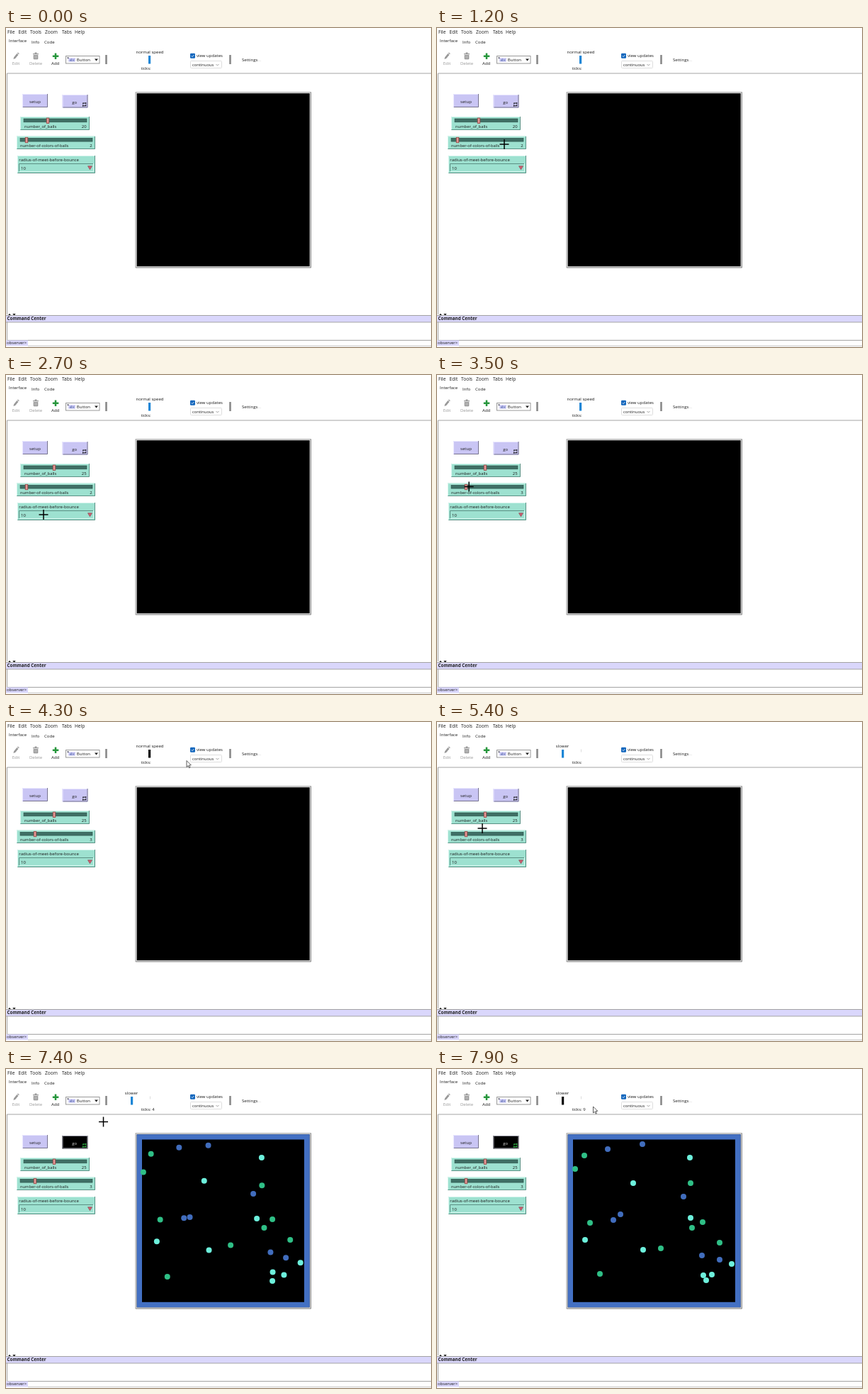
These frames come from a looping animation (600 px wide and 450 px high, 8 s). An HTML page:

```html
<!DOCTYPE html>
<html lang="en">
<head>
<meta charset="utf-8">
<title>Bouncing balls model</title>
<style>
html, body { margin: 0; width: 100%; height: 100%; overflow: hidden; background: #fff; }
svg { display: block; width: 600px; height: 450px; font: 6.05px "Open Sans", "Noto Sans", sans-serif; fill: #1c1c1c; }
text { white-space: pre; }
.menu { font-size: 6.6px; }
.mid { text-anchor: middle; }
.end { text-anchor: end; }
.off { fill: #999; }
.widget { font-size: 5.85px; }
.line { stroke: #a3a3a3; fill: none; }
.lilac { fill: #dad7fc; }
.teal { fill: #9de1d0; }
.hi { stroke: #d3f4ec; fill: none; }
.lo { stroke: #5c9185; fill: none; }
.track { fill: #3f6f65; stroke: #2c5148; stroke-width: .6; }
.thumb rect { fill: #d88080; stroke: #97413f; stroke-width: .7; }
.thumb path { stroke: #f4c4bf; stroke-width: .8; }
.btn .face { fill: #c9c5f4; }
.btn .top { stroke: #e9e7ff; fill: none; }
.btn .low { stroke: #77748f; fill: none; }
.btn .loop { stroke: #111; stroke-width: 1.1; fill: none; }
.btn.down .face { fill: #000; }
.btn.down .top { stroke: #8b8b98; }
.btn.down .low { stroke: #b5b5c0; }
.btn.down text { fill: #d9d9d9; }
.btn.down .loop { stroke: #35d04f; }
#cross { stroke: #000; stroke-width: 1.5; fill: none; }
#cross.inverse { stroke: #fff; mix-blend-mode: difference; }
</style>
</head>
<body>
<svg viewBox="0 0 600 450">
  <rect width="600" height="450" fill="#fff"/>

  <g class="menu">
    <text x="2" y="8">File</text><text x="17.5" y="8">Edit</text><text x="34" y="8">Tools</text>
    <text x="55" y="8">Zoom</text><text x="79" y="8">Tabs</text><text x="97" y="8">Help</text>
  </g>
  <text x="4" y="20">Interface</text><text x="36" y="21.5">Info</text><text x="54" y="21.5">Code</text>

  <g class="off">
    <path d="M10.5 44l.6-2.800 4.300-5.200 2.100 1.700-4.300 5.300zM15.900 35.400l.9-.9 2 1.600-.8 1z"/>
    <path d="M38 36h2.500v-1.500h3V36H46v1.200h-8zM38.700 38h6.600v5.300q0 1-1 1h-4.600q-1 0-1-1z"/>
    <path d="M40.700 39v4M42 39v4M43.300 39v4" stroke="#ddd" stroke-width=".5"/>
    <text class="mid" x="14" y="52">Edit</text><text class="mid" x="42" y="52">Delete</text>
  </g>
  <path d="M70 35.500v8.500M65.800 39.700h8.500" stroke="#27963c" stroke-width="2.500"/>
  <text class="mid" x="69.700" y="52">Add</text>

  <rect x="84.500" y="39.500" width="47.500" height="10.500" fill="#fff" stroke="#999"/>
  <rect x="88" y="42" width="10" height="5.500" fill="#d2d0f6"/>
  <text x="89.500" y="46.600" font-size="4.600" fill="#334a9c">abc</text>
  <path d="M86 41.500h3l-1.500 2z" fill="#334"/>
  <text x="99.800" y="47">Button</text>
  <path d="M125 43.500h5l-2.500 3z"/>
  <path d="M141.500 38v13M316.500 38v13" stroke="#898989" stroke-width="2.600"/>

  <text id="speed" class="mid" y="36.300"></text>
  <path id="notch" d="M203.500 38.500v4" stroke="#d4d4d4" stroke-width=".8"/>
  <rect id="knob" y="39" width="3.200" height="11.500"/>
  <text id="ticks" x="190.500" y="58.600"></text>

  <rect x="260" y="35.800" width="7" height="7" rx="1.300" fill="#1467bd"/>
  <path d="M261.700 39.300l1.300 1.400 2.400-2.700" stroke="#fff" stroke-width=".8" fill="none"/>
  <text x="269" y="41.300">view updates</text>
  <rect x="260.500" y="46.500" width="44" height="10" rx="1" fill="#fff" stroke="#dedede"/>
  <text x="263" y="54" font-size="5.800">continuous</text>
  <path d="M296.500 51l2 2 2-2" stroke="#888" stroke-width=".8" fill="none"/>
  <text x="333" y="46.500">Settings<tspan fill="#bbb">...</tspan></text>

  <path class="line" d="M600 64H1.500V404"/>

  <g class="btn" id="setup">
    <rect class="face" x="23" y="93" width="36" height="19"/>
    <path class="top" d="M23.500 111V93.500H58"/><path class="low" d="M24 111.500H58.500V93"/>
    <text class="mid" x="41" y="105.700">setup</text>
  </g>
  <g class="btn" id="go">
    <rect class="face" x="79.500" y="94" width="36" height="18.500"/>
    <path class="top" d="M80 111.500V94.500H115"/><path class="low" d="M80.500 112H115V94"/>
    <text class="mid" x="96.700" y="106.500">go</text>
    <path class="loop" d="M108.700 107.300v-1.300h3.200M112.700 105v2.200M112.700 108.300v1.400h-3.300M108.600 110.800v-2.400"/>
  </g>

  <g class="widget">
    <rect class="teal" x="20" y="125" width="98" height="19"/>
    <path class="hi" d="M20.500 143V125.500H117"/><path class="lo" d="M20.500 143.500H117.500V125"/>
    <rect class="track" x="25" y="128" width="89" height="4.800"/>
    <text x="26" y="140.600">number_of_balls</text><text class="end" id="count" x="113.500" y="140.600"></text>
    <g class="thumb" id="countThumb"><rect x="-1.800" y="127" width="3.600" height="7.500"/><path d="M0 128v5.500"/></g>

    <rect class="teal" x="15" y="152.500" width="111" height="18.500"/>
    <path class="hi" d="M15.500 170V153H125"/><path class="lo" d="M15.500 170.500H125.500V153"/>
    <rect class="track" x="20" y="155.300" width="102" height="4.800"/>
    <text x="20" y="168" font-size="5.750">number-of-colors-of-balls</text><text class="end" id="colors" x="121.700" y="168"></text>
    <g class="thumb" id="colorThumb"><rect x="-1.800" y="154.300" width="3.600" height="7.500"/><path d="M0 155.300v5.500"/></g>

    <rect class="teal" x="16" y="180" width="110" height="25"/>
    <path class="hi" d="M16.500 204V180.500H125"/><path class="lo" d="M16.500 204.500H125.500V180"/>
    <text x="18.300" y="188" font-size="6">radius-of-meet-before-bounce</text>
    <path class="lo" d="M18.500 202V191.500H123"/><path class="hi" d="M19 202.500H123.500V191"/>
    <text x="21" y="199.700" font-size="6">10</text>
    <path d="M115.500 194.800h6l-3 5z" fill="#cf5f70" stroke="#853b4a" stroke-width=".6"/>
  </g>

  <rect x="182.500" y="90" width="248.500" height="248.500" fill="#d9d9d9"/>
  <path d="M183 338V90.500H430.500" fill="none" stroke="#b0b0b0"/>
  <path d="M183 338H430.500V90.500" fill="none" stroke="#8c8c8c"/>
  <rect x="184.700" y="92.200" width="244" height="244" fill="#000"/>
  <g id="world">
    <rect x="184.700" y="92.200" width="244" height="244" fill="#4370c3"/>
    <rect x="192" y="99.500" width="229" height="229.300" fill="#000"/>
    <g id="balls"></g>
  </g>

  <path d="M2.800 405.500l2.200-2.800 2.200 2.800zM9.300 403h4.400l-2.200 2.700z"/>
  <rect class="lilac" y="405.500" width="600" height="9.500"/>
  <path class="line" d="M0 405.500H600M0 415H600M1.500 415V440.500H600"/>
  <text x="1.500" y="412.400" font-size="6.300" font-weight="700">Command Center</text>
  <rect class="lilac" y="440.500" width="31" height="8"/>
  <text x="1" y="446.400" font-size="6">observer&gt;</text>
  <path class="line" d="M31 448.500H600" opacity=".6"/>

  <path id="cross" d="M-6.500 0h13M0-7v14"/>
  <path id="arrow" d="M0 0v9l2.100-1.900 1.500 3.100 1.400-.7-1.500-3 2.800-.2z" fill="#fff" stroke="#333" stroke-width=".8"/>
</svg>
<script>
const LOOP = 8000, FRAME = 100, SETUP = 5900, START = 7000;
const $ = id => document.getElementById(id);
const ramp = (t, a, b) => Math.min(1, Math.max(0, (t - a) / (b - a)));
const place = (el, x, y) => el.setAttribute('transform', `translate(${x} ${y})`);

// x, y, then the distance covered in nine ticks
const groups = {
  '#2fbf86': [[202,118,6,4], [193,149,2,-8], [219,209,-3,8], [226,296,4,-7], [318,245,-2,8],
              [364,167,-6,-6], [377,209,-2,7], [368,224,-8,0], [403,238,-4,7]],
  '#416dbd': [[247,109,-6,4], [282,109,8,-3], [350,173,-2,7], [253,208,-4,5], [260,212,-1,-7],
              [373,255,1,8], [392,264,7,5]],
  '#6df0dc': [[364,125,-7,0], [282,155,-5,6], [351,212,7,-2], [283,256,8,-1], [216,245,-7,-4],
              [377,283,-1,8], [373,300,7,-2], [396,291,-8,-1], [413,272,6,3]]
};
const RIGHT = 417.5;
const balls = Object.entries(groups).flatMap(([color, list]) => list.map(path => {
  const el = document.createElementNS('http://www.w3.org/2000/svg', 'circle');
  el.setAttribute('r', 4);
  el.setAttribute('fill', color);
  $('balls').append(el);
  return { el, path };
}));

// time, x, y
const route = [
  [400,150,420], [700,112,250], [1000,90,170], [1200,95,164], [1600,59,131], [1700,59,131],
  [2200,68,131], [2700,53,197], [3000,29,158], [3400,41,158], [3700,57,156], [4100,203,45],
  [4300,255,54.5], [4500,203,45], [4700,178,45], [4900,178,45], [5100,120,277], [5400,64,150],
  [5800,41,104], [5900,41,104], [6300,216,245], [6800,97,104], [7100,97,104], [7700,178,45],
  [7900,220.5,53]
];

function pointer(t) {
  const i = route.findIndex(k => k[0] >= t);
  if (i < 1) return route[0].slice(1);
  const [a, b] = [route[i - 1], route[i]];
  const p = ramp(t, a[0], b[0]), e = p * p * (3 - 2 * p);
  return [a[1] + (b[1] - a[1]) * e, a[2] + (b[2] - a[2]) * e];
}

function drawPointer(t) {
  const [x, y] = pointer(t), shown = t >= route[0][0], tool = y < 64;
  const inView = x > 185 && x < 428 && y > 92 && y < 336;
  $('cross').style.display = shown && !tool ? '' : 'none';
  $('arrow').style.display = shown && tool ? '' : 'none';
  $('cross').classList.toggle('inverse', inView);
  place($('cross'), x, y);
  place($('arrow'), x, y);
}

function drawControls(t) {
  const many = ramp(t, 1700, 2200), hues = ramp(t, 3000, 3400) >= .5 ? 1 : 0;
  $('count').textContent = 20 + Math.round(5 * many);
  place($('countThumb'), 59 + 9 * many, 0);
  $('colors').textContent = 2 + hues;
  place($('colorThumb'), 29 + 12 * hues, 0);

  const slow = ramp(t, 4500, 4700);
  $('speed').textContent = slow ? 'slower' : 'normal speed';
  $('speed').setAttribute('x', slow ? 177 : 203);
  $('notch').style.display = slow ? '' : 'none';
  $('knob').setAttribute('x', 201 - 25 * slow);
  $('knob').setAttribute('fill', (t >= 4100 && t < 5000) || t >= 7700 ? '#000' : '#1c86d6');

  $('setup').classList.toggle('down', t >= 5800 && t < 6000);
  $('go').classList.toggle('down', t >= START - 100);
}

function drawWorld(t) {
  const ready = t >= SETUP, tick = Math.max(0, Math.floor((t - START) / FRAME));
  $('ticks').textContent = 'ticks:' + (ready ? ' ' + tick : '');
  $('world').style.display = ready ? '' : 'none';
  for (const { el, path: [x, y, dx, dy] } of balls) {
    const px = x + dx * tick / 9;
    el.setAttribute('cx', RIGHT - Math.abs(RIGHT - px));
    el.setAttribute('cy', y + dy * tick / 9);
  }
}

function draw(now) {
  const t = Math.floor(now % LOOP / FRAME) * FRAME;
  drawControls(t);
  drawWorld(t);
  drawPointer(t);
}

const begin = performance.now();
function loop() {
  draw(performance.now() - begin);
  requestAnimationFrame(loop);
}
loop();
</script>
</body>
</html>
```
